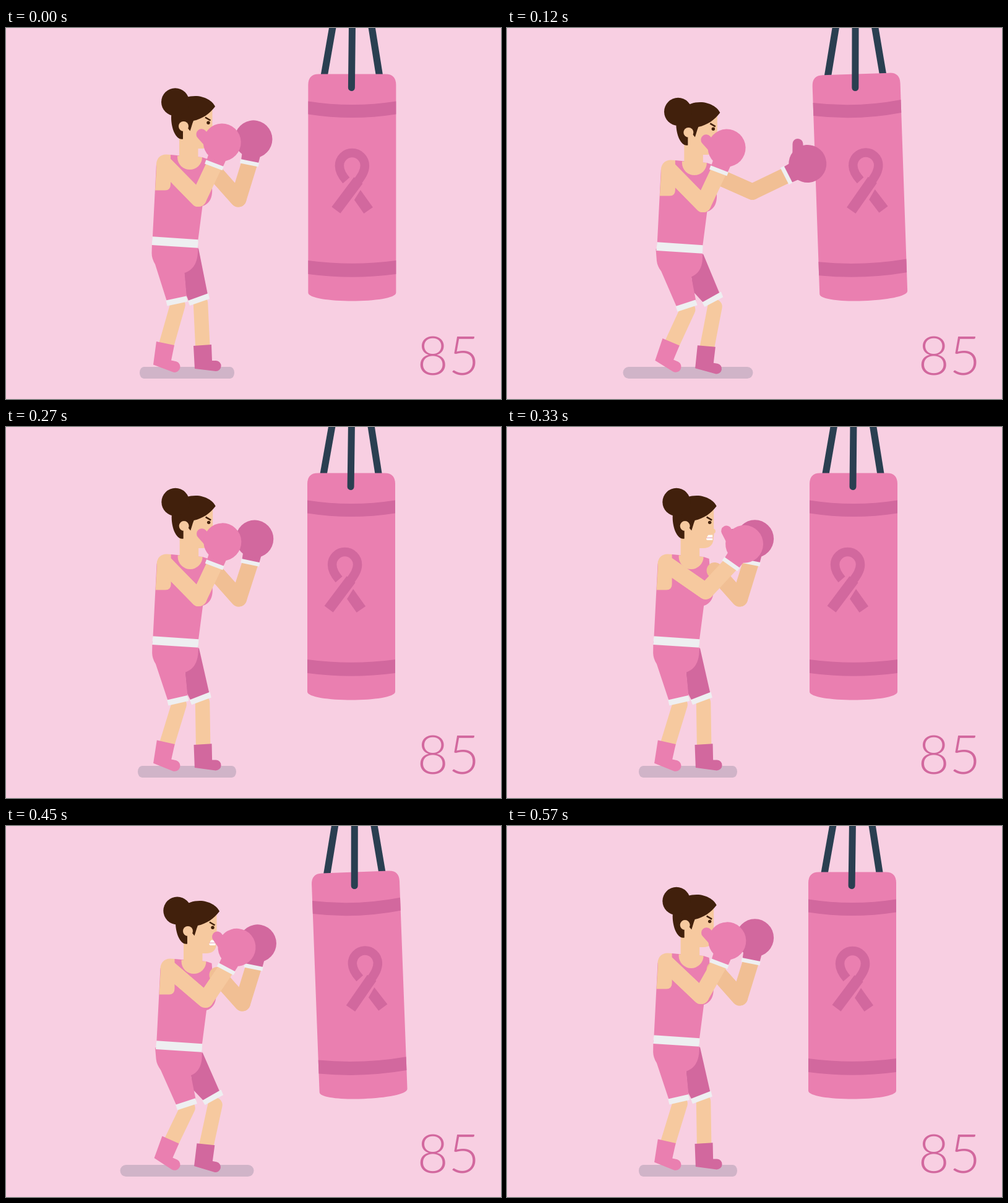
An HTML page with a canvas that plays this animation: 800x600 px, repeating every 600 ms.

```html
<!DOCTYPE html>
<html lang="en">
<head>
<meta charset="utf-8">
<title>Boxing</title>
<style>
html, body { margin: 0; width: 100%; height: 100%; overflow: hidden; background: #f8cfe2; }
canvas { display: block; }
</style>
</head>
<body>
<canvas id="stage" width="800" height="600"></canvas>
<script>
const c = document.getElementById('stage').getContext('2d');
const LOOP = 600, STEP = 30, RAD = Math.PI / 180;
const BG = '#f8cfe2', PINK = '#ea7fb0', DARK = '#d2689e', SKIN = '#f6c99f', SKIN2 = '#f1bf94',
      HAIR = '#41200c', WHITE = '#eeeff1', STRAP = '#2a3f51', SHADE = '#d0b4c8';

// Rises from 0 to 1 between a and b, falls back to 0 at e
const ramp = (t, a, b, e) => Math.max(0, Math.min((t - a) / (b - a), (e - t) / (e - b)));
const smooth = u => u * u * (3 - 2 * u);

const bob = t => (1 - Math.cos(2 * Math.PI * t / 300)) / 2;
const jab = t => 1.03 * smooth(ramp(t, 0, 135, 280));
const cross = t => smooth(ramp(t, 300, 385, 470));
const recoil = t => 7 * ramp(t, 440, 565, 600);
const swing = t => -2 + 8 * (ramp(t, -35, 170, 270) + ramp(t, 300, 420, 570));
const twist = t => 16 * ramp(t, 0, 180, 235) - 13 * ramp(t, 210, 285, 450) + 12.5 * ramp(t, 400, 460, 575);

function path(d, color) {
  c.fillStyle = color;
  c.fill(new Path2D(d));
}

function poly(color, ...pts) {
  path('M' + pts.map(p => p.join(' ')).join('L') + 'Z', color);
}

function disc(x, y, r, color) {
  c.fillStyle = color;
  c.beginPath();
  c.arc(x, y, r, 0, 7);
  c.fill();
}

function line(color, width, cap, ...pts) {
  c.strokeStyle = color;
  c.lineWidth = width;
  c.lineCap = cap;
  c.lineJoin = 'round';
  c.beginPath();
  pts.forEach(p => c.lineTo(p[0], p[1]));
  c.stroke();
}

function group(dx, dy, draw) {
  c.save();
  c.translate(dx, dy);
  draw();
  c.restore();
}

function turn(x, y, deg, draw) {
  c.save();
  c.translate(x, y);
  c.rotate(deg * RAD);
  c.translate(-x, -y);
  draw();
  c.restore();
}

function ribbon() {
  c.strokeStyle = DARK;
  c.lineWidth = 14.5;
  c.lineCap = 'butt';
  c.stroke(new Path2D('M550.5 246.5C544 239 539.5 231 539.5 222.5A20.5 20.5 0 0 1 580.5 222.5C580.5 232 575 240 568 249.5'));
  line(DARK, 17.5, 'butt', [570, 246.5], [534, 294.5]);
  poly(DARK, [573.5, 262], [593.5, 290], [579, 300], [563.5, 278]);
}

function band(y, h, sag) {
  path(`M489 ${y}Q560 ${y + sag} 631 ${y}V${y + h}Q560 ${y + h + sag} 489 ${y + h}Z`, DARK);
}

function bag(t) {
  const d = swing(t), top = d * 0.75, low = d * 0.95;
  for (const side of [-1, 1]) {
    line(STRAP, 11.2, 'butt', [560 + side * 31 + top, -5], [559.4 + side * 46 + low, 85]);
  }
  group(d, 0, () => turn(560, 75, -Math.max(0, d) * 0.487, () => {
    path('M489 92Q489 74.5 506 74.5H614Q631 74.5 631 92V428C631 437 595 441.5 560 441.5C525 441.5 489 437 489 428Z', PINK);
    band(118.5, 21, 11);
    band(376, 22, 9.5);
    group(twist(t), 0, ribbon);
  }));
  line(STRAP, 11, 'round', [560 + top, -8], [559 + low, 96.5]);
}

function legs(s, bx, by) {
  const k = Math.pow(s, 0.87);
  const p = (x, y, dx, dy) => [x + dx * k, y + dy * k];

  line(SKIN, 23.5, 'round', p(314.5, 445, 23.5, 6), p(318, 518, 5.5, 0));
  turn(310, 545, 9.9 * s, () => path(
    'M303 514L332 512L333 538H339.5A8.5 8.5 0 0 1 338.8 555L305 551Z', DARK));
  poly(DARK, p(288, 380, 11, 8), p(311, 356, 6.5, 10), p(326, 431, 20, 0),
    p(295, 441, 24, 3), p(291, 431, 11, -5), p(288, 396, 11, 8));
  group(bx, by, () => turn(262, 342, -10 * k, () =>
    poly(WHITE, [294, 441], [327, 429], [329, 438], [297, 449])));

  line(SKIN, 24.5, 'round', p(277.5, 448, 16, 8), p(259, 513, 9, -4));
  turn(273, 548, 12.3 * s, () => path(
    'M243 507L272 513L267 537.5L275 539.2A9 9 0 0 1 270 556.5L238 544.5Z', PINK));
  group(bx, by, () => turn(266, 360, -6.4 * k, () => {
    path('M236 345L310 350C312 380 302 392 288.5 396L292 436L260 442L241 382Q235.5 373 235.5 364Z', PINK);
    poly(WHITE, [258.5, 440.5], [291.5, 433.5], [293.5, 442.5], [260.5, 449.5]);
  }));
}

function torso() {
  path('M243 220L266 205L277 206L317 209L326 212L328 238C335 255 338 282 317.5 288L310 346H236.5Z', PINK);
  path('M241 262.5L243.5 220Q244 205 259 204.5L266 205V253Q266 262.5 257 262.5Z', SKIN);
  poly(WHITE, [236.7, 337.3], [310.8, 342.3], [310, 355.7], [235.5, 351]);
  c.beginPath();
  c.fillStyle = SKIN;
  c.arc(297, 209, 20, 0, Math.PI + 0.13);
  c.fill();
}

function head() {
  path('M280 150H310.5V212H280Z', SKIN);
  path('M282 130H333.5V163.5A4 4 0 0 1 334 171L333 180Q332 195 316 195H300L282 175Z', SKIN);
  path('M267 145C267 123 285 110 306 110C321 110 334 118 338 127C329 139 317 147 303 150C300.5 156 299.5 161 297.5 166.5L293 161L286 167V179.5C275 182 267 163 267 145Z', HAIR);
  disc(287, 159, 8, SKIN);
  line(HAIR, 2.6, 'butt', [322, 144.5], [330.5, 149.5]);
  disc(327, 153.3, 2.7, HAIR);
  path('M324.5 173.6L331.5 173.4V182H323Q321 181.5 321.5 179Z', '#fff');
  line('#e9a0b5', 1.2, 'butt', [321.5, 178.2], [331.5, 178]);
}

function arm(color, shoulder, wrist, upper, fore) {
  const [x, y] = shoulder, dx = wrist[0] - x, dy = wrist[1] - y, d = Math.hypot(dx, dy);
  const along = (upper * upper - fore * fore + d * d) / (2 * d);
  const drop = Math.sqrt(Math.max(0, upper * upper - along * along));
  const straight = d >= upper + fore;
  const elbow = straight ? [x + dx / 2, y + dy / 2]
    : [x + (dx * along - dy * drop) / d, y + (dy * along + dx * drop) / d];
  line(color, 26, 'round', shoulder, elbow);
  line(color, 26, 'butt', shoulder, elbow, wrist);
}

// Local x points along the hand, y across it
function glove(color, wrist, deg) {
  c.save();
  c.translate(wrist[0], wrist[1]);
  c.rotate(deg * RAD);
  poly(color, [0, -14], [24, -15.5], [24, 15.5], [0, 14]);
  line(color, 17, 'round', [39.5, -37], [26, -11]);
  disc(39, -1.2, 30.5, color);
  poly(WHITE, [-3.3, -15.2], [3.3, -15.2], [3.3, 15.2], [-3.3, 15.2]);
  c.restore();
}

function boxer(t, s) {
  const bx = 6.5 * s, by = 10 * s;
  legs(s, bx, by);
  group(bx, by, torso);
  group(7 * s, 11 * s, head);
  disc(273.5 + 3.3 * s, 119.7 + 17.3 * s, 22.5, HAIR);

  const left = jab(t);
  const far = [393.5 + bx + 52.5 * left, 218.3 + by + 11 * left];
  arm(SKIN2, [335 + bx, 231 + by], far, 61, 61);
  glove(DARK, far, -78.7 + 52 * left);

  const right = cross(t);
  const near = [336.5 + bx + 87 * right + recoil(t), 221.8 + by - 3.5 * right];
  arm(SKIN, [256 + bx, 220 + by], near, 78.5, 60);
  glove(PINK, near, -69.2 + 51 * right);
}

function draw(t) {
  const s = bob(t);
  c.fillStyle = BG;
  c.fillRect(0, 0, 800, 600);

  c.fillStyle = DARK;
  c.font = '300 87px Lato, "Open Sans", sans-serif';
  c.fillText('85', 664.5, 560.5);

  const w = 153 + 63 * s;
  c.fillStyle = SHADE;
  c.beginPath();
  c.roundRect(292.5 - w / 2, 548, w, 19, { x: 9.5 * w / 216, y: 9.5 });
  c.fill();

  bag(t);
  boxer(t, s);
}

const start = performance.now();
function frame(now) {
  const t = Math.max(0, now - start) % LOOP;
  draw(Math.floor(t / STEP) * STEP);
  requestAnimationFrame(frame);
}
draw(0);
requestAnimationFrame(frame);
</script>
</body>
</html>
```
